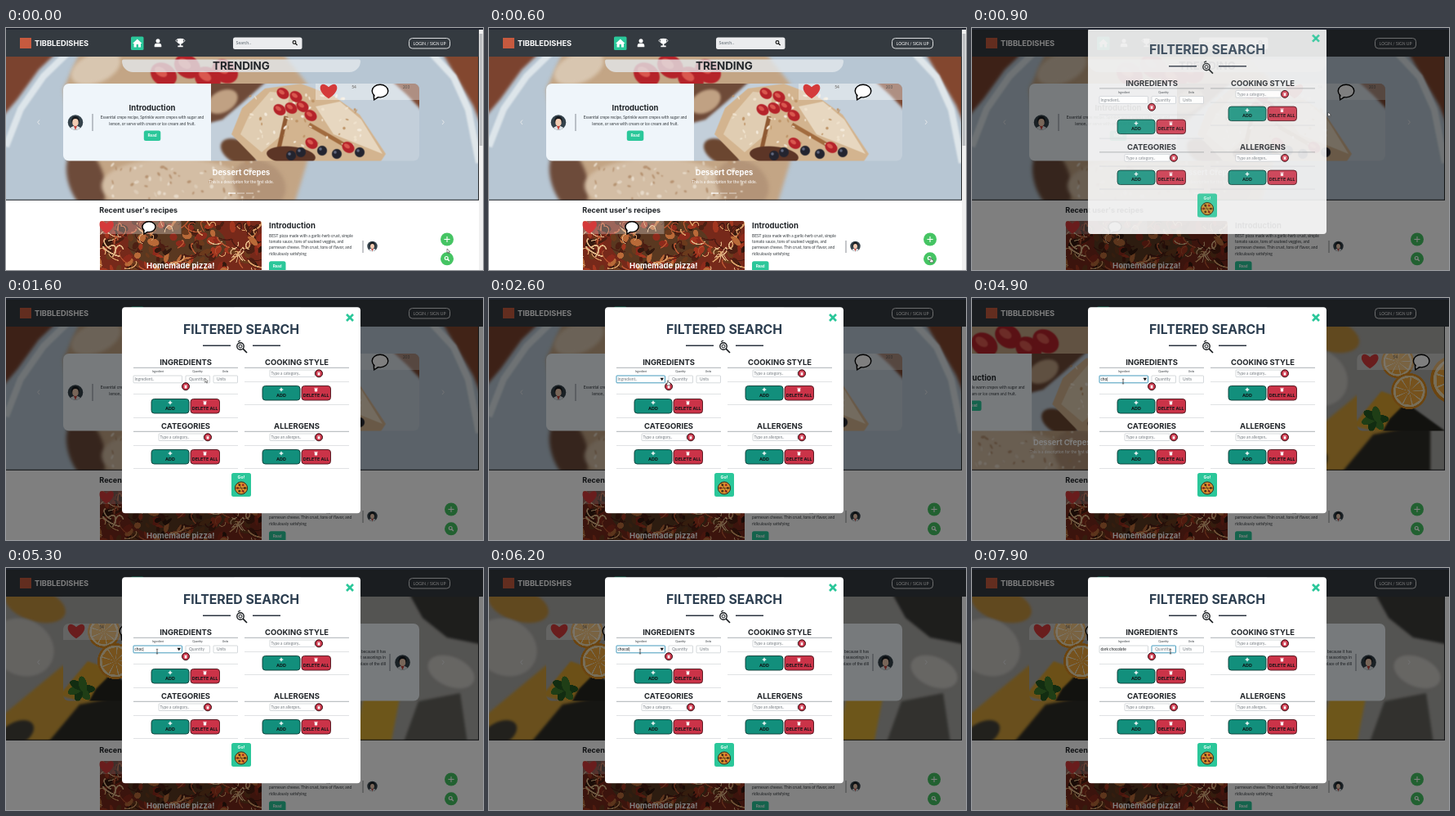
These frames come from a looping animation (584x296 px, 8000 ms). An HTML page with a canvas:

```html
<!DOCTYPE html>
<html lang="en">
<head>
<meta charset="utf-8">
<title>Recipe search</title>
<style>
html, body { margin: 0; width: 584px; height: 296px; overflow: hidden; background: #fff; }
canvas { display: block; width: 584px; height: 296px; }
</style>
</head>
<body>
<canvas id="stage"></canvas>
<script>
const W = 584, H = 296, LOOP = 8000, PAGE = 579;
const HEAD = 'Inter, "Open Sans", sans-serif', BODY = 'Lato, "Open Sans", sans-serif';
const INK = '#212529', GREEN = '#2bc79a', ROUND = '#45c463', RED = '#cb3348', TEAL = '#128f7c';
const dpr = window.devicePixelRatio || 1;
const stage = document.getElementById('stage');
stage.width = W * dpr;
stage.height = H * dpr;
let c = stage.getContext('2d');

const clamp = v => Math.max(0, Math.min(1, v));
const mix = (a, b, p) => a + (b - a) * p;
const smooth = p => p * p * (3 - 2 * p);

function rng(seed) {
  return () => (seed = (seed * 16807) % 2147483647) / 2147483647;
}
function box(x, y, w, h, r, fill, line, lw = 1) {
  c.beginPath();
  c.roundRect(x, y, w, h, r);
  if (fill) { c.fillStyle = fill; c.fill(); }
  if (line) { c.strokeStyle = line; c.lineWidth = lw; c.stroke(); }
}
function oval(x, y, rx, ry, rot, fill, line, lw = 1) {
  c.beginPath();
  c.ellipse(x, y, rx, ry, rot, 0, 7);
  if (fill) { c.fillStyle = fill; c.fill(); }
  if (line) { c.strokeStyle = line; c.lineWidth = lw; c.stroke(); }
}
function disc(x, y, r, fill, line, lw) { oval(x, y, r, r, 0, fill, line, lw); }
function poly(pts, fill, line, lw = 1, close = true) {
  c.beginPath();
  pts.forEach(p => c.lineTo(p[0], p[1]));
  if (close) c.closePath();
  if (fill) { c.fillStyle = fill; c.fill(); }
  if (line) { c.strokeStyle = line; c.lineWidth = lw; c.stroke(); }
}
function seg(x1, y1, x2, y2, color, lw = 1) {
  poly([[x1, y1], [x2, y2]], null, color, lw, false);
}
function text(s, x, y, size, color, align = 'left', font = BODY, weight = 400) {
  c.font = `${weight} ${size}px ${font}`;
  c.textAlign = align;
  c.textBaseline = 'alphabetic';
  c.fillStyle = color;
  c.fillText(s, x, y + size * 0.35);
}
function title(s, x, y, size, color = INK, align = 'center') {
  text(s, x, y, size, color, align, HEAD, 700);
}
function clipped(x, y, w, h, r, draw) {
  c.save();
  c.beginPath();
  c.roundRect(x, y, w, h, r);
  c.clip();
  draw();
  c.restore();
}

// Soft stand-ins for the food photographs, painted once
function photo(w, h, paint) {
  const k = 3, cv = document.createElement('canvas'), main = c;
  cv.width = w * k;
  cv.height = h * k;
  c = cv.getContext('2d');
  c.scale(k, k);
  paint(w, h);
  c = main;
  return cv;
}
function specks(rnd, n, x, y, w, h, r, colors) {
  for (let i = 0; i < n; i++) {
    oval(x + rnd() * w, y + rnd() * h, r * (0.5 + rnd()), r * (0.3 + rnd() * 0.7), rnd() * 3,
      colors[Math.floor(rnd() * colors.length)]);
  }
}
function berry(x, y, r) {
  oval(x, y, r, r * 0.8, 0.6, '#b5232a');
  oval(x - r * 0.2, y - r * 0.2, r * 0.5, r * 0.3, 0.6, '#d9584f');
}
const crepes = photo(255, 95, (w, h) => {
  const rnd = rng(11);
  box(0, 0, w, h, 0, '#c3cfda');
  c.filter = 'blur(5px)';
  poly([[-9, -9], [75, -9], [40, 22], [14, 44], [-9, 50]], '#6e4a38');
  oval(14, 22, 20, 13, -0.5, '#c0a183');
  poly([[215, -9], [265, -9], [265, 40], [240, 14]], '#7c4a35');
  oval(34, 84, 24, 14, 0.5, '#6b4630');
  c.filter = 'blur(1.5px)';
  poly([[25, 62], [38, 30], [66, 6], [110, 0], [150, 15], [182, 38], [214, 86], [206, 98], [60, 98]], '#d3b48f');
  poly([[46, 40], [72, 10], [96, 12], [90, 60], [62, 84], [36, 62]], '#e0cdb2');
  poly([[128, 28], [158, 22], [184, 44], [210, 86], [150, 62]], '#e7d7c0');
  seg(92, 40, 82, 84, '#8f5a33', 5);
  seg(120, 50, 165, 76, '#a26c3f', 5);
  oval(98, 88, 30, 11, 0.1, '#5c3526');
  specks(rnd, 60, 48, 14, 135, 62, 2, ['#f3eadb', '#efe2cd', '#be9467']);
  for (const [x, y] of [[88, 12], [104, 16], [112, 28], [84, 32], [122, 39], [98, 30], [123, 73], [168, 78]]) berry(x, y, 8);
  for (const [x, y] of [[98, 88], [110, 84], [136, 82], [154, 86], [182, 84]]) {
    disc(x, y, 6, '#23242f');
    disc(x - 2, y - 2, 1.8, '#626980');
  }
});
const crepesWide = photo(PAGE, 176, (w, h) => {
  const rnd = rng(5);
  box(0, 0, w, h, 0, '#b7c6d3');
  c.filter = 'blur(6px)';
  poly([[-20, -20], [78, -20], [40, 16], [14, 52], [-20, 92]], '#7b432f');
  poly([[525, -20], [600, -20], [600, 130], [572, 60]], '#83472f');
  c.filter = 'blur(3px)';
  poly([[76, -5], [46, 24], [18, 64], [0, 110]], null, '#dde5ea', 8, false);
  poly([[520, -5], [548, 25], [566, 65], [579, 130]], null, '#dfe6ea', 8, false);
  c.filter = 'blur(7px)';
  poly([[70, 40], [95, -15], [330, -15], [390, 60], [350, 190], [90, 190]], '#c3a585');
  oval(110, 14, 32, 18, -0.4, '#d8c6b0');
  oval(98, 150, 22, 40, -0.3, '#6d4b3a');
  oval(205, 158, 88, 34, 0, '#d3bda4');
  oval(310, 156, 34, 28, 0.6, '#b39478');
  c.filter = 'blur(2px)';
  for (const [x, y] of [[193, 22], [222, 12], [247, 27], [268, 18]]) berry(x, y, 17);
  specks(rnd, 60, 130, 128, 180, 48, 2.4, ['#e6d9c8', '#b69372', '#dccbb6']);
});
function slice(x, y, r) {
  disc(x, y, r, '#d98b21');
  disc(x, y, r * 0.88, '#f0ddb4');
  for (let i = 0; i < 9; i++) {
    const a = i * Math.PI * 2 / 9;
    poly([[x, y], [x + r * 0.78 * Math.cos(a), y + r * 0.78 * Math.sin(a)],
      [x + r * 0.78 * Math.cos(a + 0.6), y + r * 0.78 * Math.sin(a + 0.6)]], '#eda53b');
  }
}
const oranges = photo(255, 95, (w, h) => {
  box(0, 0, w, h, 0, '#a9a9a6');
  c.filter = 'blur(3px)';
  poly([[-5, 88], [30, 46], [70, 60], [40, 100]], '#d9a12e');
  poly([[40, 80], [60, 60], [110, 96], [30, 98]], '#25251f');
  c.filter = 'blur(0.7px)';
  slice(50, 10, 20);
  slice(64, 46, 22);
  slice(120, 32, 30);
  slice(158, 66, 24);
  for (let i = 0; i < 6; i++) {
    oval(22 + 7 * Math.cos(i), 80 + 6 * Math.sin(i), 10, 5, i * 0.9, i % 2 ? '#3f7d2c' : '#245a22');
  }
});
const orangesWide = photo(PAGE, 176, (w, h) => {
  box(0, 0, w, h, 0, '#aaa9a5');
  c.filter = 'blur(5px)';
  oval(36, 10, 38, 20, 0.3, '#c4933f');
  oval(20, 62, 40, 34, 0.5, '#c9c7c2');
  poly([[-10, 150], [70, 84], [150, 120], [60, 186], [-10, 186]], '#d3a03a');
  poly([[45, 186], [90, 132], [160, 118], [160, 186]], '#2d2c27');
  oval(12, 168, 24, 14, -0.5, '#45423a');
  poly([[425, 186], [440, 112], [482, 124], [470, 186]], '#dcae35');
  poly([[490, -10], [590, -10], [590, 60], [540, 50], [510, 26]], '#3c3c39');
  poly([[484, 186], [505, 128], [556, 118], [566, 186]], '#64635d');
  oval(545, 92, 30, 18, 0.4, '#cfcdc8');
});
const pizza = photo(199, 62, (w, h) => {
  const rnd = rng(29);
  box(0, 0, w, h, 0, '#76291a');
  c.filter = 'blur(0.5px)';
  oval(95, 28, 60, 30, 0, '#5a3820');
  specks(rnd, 150, 0, 0, w, h, 5, ['#a2361f', '#4d2013', '#b96a38', '#33190f', '#8d2a1b', '#6b3a1c']);
  for (let i = 0; i < 80; i++) {
    const a = rnd() * 6;
    c.beginPath();
    c.ellipse(rnd() * w, rnd() * h, 4 + rnd() * 9, 2 + rnd() * 4, a, a, a + 2.6);
    c.strokeStyle = ['#dba069', '#b85632', '#e2b787', '#4b1a12'][i % 4];
    c.lineWidth = 0.8 + rnd();
    c.stroke();
  }
});

function heart(x, y, s) {
  c.beginPath();
  c.moveTo(x, y + s);
  c.bezierCurveTo(x - s * 1.9, y - s * 0.2, x - s, y - s * 1.6, x, y - s * 0.5);
  c.bezierCurveTo(x + s, y - s * 1.6, x + s * 1.9, y - s * 0.2, x, y + s);
  c.fillStyle = '#d43a3a';
  c.fill();
}
function bubble(x, y, s) {
  poly([[x - s * 0.8, y + s * 0.3], [x - s * 0.75, y + s], [x - s * 0.1, y + s * 0.6]], '#fff', '#000', 1.5);
  oval(x, y - s * 0.1, s, s * 0.8, 0, '#fff', '#000', 1.4);
  poly([[x - s * 0.65, y + s * 0.3], [x - s * 0.65, y + s * 0.8], [x - s * 0.1, y + s * 0.5]], '#fff');
}
function avatar(x, y, r) {
  disc(x, y, r, '#34424b');
  clipped(x - r, y - r, r * 2, r * 2, r, () => {
    oval(x, y + r, r * 0.75, r * 0.55, 0, '#dfe5e8');
    poly([[x - r * 0.25, y + r * 0.4], [x + r * 0.25, y + r * 0.4], [x, y + r]], '#c4443c');
    oval(x, y - r * 0.25, r * 0.52, r * 0.55, 0, '#171a1e');
    oval(x, y, r * 0.4, r * 0.48, 0, '#f2cdb4');
  });
}
function lens(x, y, r, color, lw) {
  disc(x, y, r, null, color, lw);
  seg(x + r * 0.7, y + r * 0.7, x + r * 1.9, y + r * 1.9, color, lw * 1.2);
}
function cross(x, y, r, color, lw) {
  seg(x - r, y, x + r, y, color, lw);
  seg(x, y - r, x, y + r, color, lw);
}
function bin(x, y, s) {
  box(x - s * 0.75, y - s * 0.55, s * 1.5, s * 1.6, 0.4, '#fff');
  seg(x - s, y - s * 0.85, x + s, y - s * 0.85, '#fff', s * 0.35);
}
function pie(x, y, r) {
  disc(x, y, r, '#d9912f', '#3a2518', 1);
  for (let i = 0; i < 6; i++) {
    disc(x + r * 0.58 * Math.cos(i * 1.05), y + r * 0.58 * Math.sin(i * 1.05), r * 0.19, i % 2 ? '#a52a20' : '#4a3217');
  }
  seg(x - r, y, x + r, y, '#3a2518', 0.6);
  seg(x - r * 0.5, y - r * 0.85, x + r * 0.5, y + r * 0.85, '#3a2518', 0.6);
}
function readButton(x, y) {
  box(x, y, 20.5, 12.5, 2.5, GREEN);
  text('Read', x + 10.2, y + 6.2, 4.9, '#fff', 'center', BODY, 700);
}

function nav() {
  box(0, 0, W, 35, 0, '#343a40');
  box(17, 12, 14, 13, 0, '#c65a3f');
  title('TIBBLEDISHES', 35, 19, 9.3, '#fff', 'left');
  box(153, 10.5, 15.5, 16.5, 1.5, GREEN);
  poly([[155, 19], [160.8, 13.5], [166.6, 19], [165, 19], [165, 23.5], [162, 23.5], [162, 20],
    [159.6, 20], [159.6, 23.5], [156.6, 23.5], [156.6, 19]], '#fff');
  disc(186, 15.8, 2.5, '#fff');
  box(181.7, 18.8, 8.6, 4.5, [3, 3, 0.5, 0.5], '#fff');
  oval(213.5, 15.5, 5.4, 2.2, 0, null, '#fff', 1);
  box(210, 13, 7, 6.5, [0, 0, 3, 3], '#fff');
  box(212.7, 19, 1.6, 3, 0, '#fff');
  box(210.3, 21.6, 6.4, 1.6, 0.5, '#fff');
  box(278, 11.5, 84.5, 14.5, 2.5, '#ebecee');
  text('Search..', 281.5, 18.5, 5.4, '#5e6870');
  lens(353, 17.5, 1.9, '#111', 1.1);
  box(493.5, 12.5, 50, 12.5, 4, null, '#eef0f1', 0.9);
  text('LOGIN / SIGN UP', 518.6, 18.8, 5, '#fff', 'center');
}
function reactions(x) {
  box(x, 68, 127, 20, 0, 'rgba(255,255,255,.38)');
  heart(x + 16, 77, 9.3);
  text('54', x + 47, 72, 4.9, '#5d5853', 'center');
  bubble(x + 79, 78, 9.8);
  text('203', x + 111, 72, 4.9, '#5d5853', 'center');
}
function slide(n) {
  const left = n ? 325 : 70, mid = n ? 397 : 179;
  c.drawImage(n ? orangesWide : crepesWide, 0, 35, PAGE, 176);
  clipped(70, 68, 436, 94.5, 7, () => {
    c.drawImage(n ? oranges : crepes, n ? 70 : 251, 68, 255, 95);
    box(left, 68, 181, 95, 0, '#eff5fa');
    reactions(n ? 70 : 379);
  });
  title('Introduction', mid, 98 - n * 8, 9.5);
  const lines = n
    ? ['A light salad that everyone loves because it has', 'a sweet dressing, with bright seasonings in', 'each bite; mint may take the place of the dill']
    : ['Essential crepe recipe, Sprinkle warm crepes with sugar and', 'lemon, or serve with cream or ice cream and fruit.'];
  lines.forEach((s, i) => n
    ? text(s, 465, 102 + i * 7.5, 4.87, '#33393e', 'right')
    : text(s, mid, 109.7 + i * 7.5, 4.87, '#33393e', 'center'));
  readButton(mid - 10.2, n ? 130 : 125.5);
  avatar(n ? 485.5 : 85, 115.5, 9.3);
  seg(n ? 470 : 106, 105, n ? 470 : 106, 126, '#596168', 0.7);
  title(n ? 'Orange Salad' : 'Dessert Crepes', 288, 177, 9.3, '#fff');
  text(`This is a description for the ${n ? 'second' : 'first'} slide.`, 288, 188, 4.87, '#fff', 'center');
}
function hero(t) {
  // ease-in-out slide, 600 ms
  const p = clamp((t - 4680) / 600), shift = PAGE * smooth(p);
  clipped(0, 35, PAGE, 176, 0, () => {
    for (let n = 0; n < 2; n++) {
      const x = n * PAGE - shift;
      if (Math.abs(x) >= PAGE) continue;
      c.save();
      c.translate(x, 0);
      slide(n);
      c.restore();
    }
    box(142, 38.5, 292, 15.5, [2, 2, 14, 14], 'rgba(228,234,238,.78)');
    title('TRENDING', 288, 46.7, 13.4);
    for (let i = 0; i < 3; i++) {
      box(272 + i * 11, 201.5, 9, 1.2, 0, i === (p > 0 ? 1 : 0) ? '#fff' : 'rgba(255,255,255,.5)');
    }
    poly([[41, 112.5], [38.7, 115.2], [41, 118]], null, '#e6e8ea', 1, false);
    poly([[534, 112.5], [536.3, 115.2], [534, 118]], null, '#e6e8ea', 1, false);
  });
  seg(0, 210.3, PAGE, 210.3, '#25282b', 1);
  seg(578.5, 35, 578.5, 210.5, '#25282b', 1);
}
function recent() {
  title("Recent user's recipes", 114.3, 223, 9.05, INK, 'left');
  clipped(114.5, 236, 198.5, 62, 3, () => {
    c.drawImage(pizza, 114.5, 236, 199, 62);
    box(114.5, 236, 100, 16, 0, 'rgba(255,255,255,.28)');
    heart(123, 243.5, 8);
    bubble(175, 244, 8);
    title('Homemade pizza!', 213.8, 291, 9.5, '#fff');
  });
  title('Introduction', 322, 242, 9.5, INK, 'left');
  ['BEST pizza made with a garlic-herb crust, simple', 'tomato sauce, tons of sauteed veggies, and',
    'parmesan cheese. Thin crust, tons of flavor, and', 'ridiculously satisfying']
    .forEach((s, i) => text(s, 322, 253.8 + i * 7.4, 4.87, '#33393e'));
  seg(437, 260, 437, 275, '#596168', 0.7);
  avatar(448.5, 267, 6.2);
  readButton(322, 285.3);
}
function page(t, open) {
  box(0, 0, W, H, 0, '#fff');
  nav();
  hero(t);
  recent();
  const x = open ? 545 : 540;
  disc(x, 258.5, 8, ROUND);
  cross(x, 258.5, 3.6, '#fff', 1.1);
  disc(x, 282.3, 8, ROUND);
  lens(x - 0.8, 281.4, 1.9, '#fff', 1.2);
  if (!open) {
    box(PAGE, 2, 5, H, 0, '#f0f0f0');
    box(PAGE + 0.7, 7, 3.6, 137, 0, '#bcbec1');
  }
}

function field(x, y, w, h, label, focus, value) {
  box(x, y, w, h, 0.8, '#fff', focus ? '#2f8fb5' : '#b9bfc4', focus ? 0.9 : 0.6);
  clipped(x - 0.5, y, w, h, 0, () =>
    text(value || label, x + 1.5, y + h / 2, 4.87, value ? '#15191c' : '#767d83'));
}
function trash(x, y) {
  disc(x, y, 4.5, RED, '#331014', 1);
  bin(x, y + 0.2, 1.9);
}
function buttons(x, y) {
  box(x + 0.5, y + 0.5, 46, 17.5, 3.5, TEAL, '#0c3b35', 0.9);
  cross(x + 23.5, y + 5, 2.3, '#fff', 1.3);
  title('ADD', x + 23.5, y + 12, 5.4, '#101416');
  box(x + 48.5, y + 0.5, 35.5, 17.5, 3.5, RED, '#4a1119', 0.9);
  bin(x + 66, y + 5.2, 2.2);
  title('DELETE ALL', x + 66.2, y + 12, 5.4, '#101416');
}
function rule(x, y, color = '#d3d6d9') { seg(x, y, x + 128, y, color, 0.7); }
function group(x, y, name, hint) {
  title(name, x + 64, y, 9.45);
  rule(x, y + 6.3, '#8a9095');
  field(x + 31, y + 9, 55, 8.5, hint);
  trash(x + 91, y + 13.3);
  rule(x, y + 23.5);
  buttons(x + 21.5, y + 28);
  rule(x, y + 51.5);
}
const TYPED = [[3900, 'c'], [4300, 'ch'], [4750, 'cho'], [5300, 'choc'], [5600, 'choco'], [5900, 'chocol'], [6900, 'dark chocolate']];
function modal(t) {
  box(142, 11.3, 292, 252, 4, '#fff');
  title('FILTERED SEARCH', 288, 38, 15.8, '#2c3e50');
  seg(241, 58.2, 275, 58.2, '#2c3440', 1.5);
  seg(302, 58.2, 336, 58.2, '#2c3440', 1.5);
  lens(287, 59, 4.2, '#15191c', 1.4);
  disc(287, 59, 2, null, '#15191c', 1);
  seg(284, 53.5, 287, 52, '#15191c', 1.2);
  seg(417, 20, 425, 28, GREEN, 2.7);
  seg(425, 20, 417, 28, GREEN, 2.7);

  const value = TYPED.reduce((v, [at, s]) => t >= at ? s : v, '');
  const onName = t >= 2250 && t < 7400, onQty = t >= 7400;
  title('INGREDIENTS', 220, 79, 9.45);
  rule(156, 85.3, '#8a9095');
  text('Ingredient', 186, 90, 3.2, '#33393e', 'center');
  text('Quantity', 234.5, 90, 3.2, '#33393e', 'center');
  text('Units', 268.5, 90, 3.2, '#33393e', 'center');
  field(156, 95, 59.5, 8.8, 'Ingredient..', onName, value);
  if (onName) {
    poly([[209.5, 97.7], [214, 97.7], [211.75, 101.2]], '#111');
    if (t % 1000 < 500 || value) {
      c.font = `4.87px ${BODY}`;
      const x = 157.8 + c.measureText(value).width;
      seg(x, 97, x, 102, '#333', 0.5);
    }
  }
  field(220, 95, 29.5, 8.8, '  Quantity', onQty);
  field(254, 95, 29.5, 8.8, '  Units');
  trash(220, 108.2);
  rule(156, 117.5);
  buttons(177.5, 123);
  rule(156, 146.5);
  group(292, 79, 'COOKING STYLE', 'Type a category..');
  group(156, 157, 'CATEGORIES', 'Type a category..');
  group(292, 157, 'ALLERGENS', 'Type an allergen..');
  box(276, 214, 24, 29, 2.5, GREEN);
  title('Go!', 288, 219.3, 5.2, '#fff');
  pie(288, 232.5, 7.6);
}

const PATH = [[0, 540, 271, 'arrow'], [300, 540, 271, 'arrow'], [500, 541, 282, 'hand'], [780, 541, 282, 'hand'],
  [900, 436, 104, 'arrow'], [1500, 250, 99, 'arrow'], [2000, 190, 100, 'beam'], [2350, 190, 100, 'beam'],
  [2600, 219, 102, 'hand'], [3000, 185, 102, 'beam'], [6400, 185, 102, 'beam'], [6700, 180, 108, 'arrow'],
  [6950, 180, 108, 'arrow'], [7350, 243, 102, 'beam'], [8000, 243, 102, 'beam']];
function cursor(t) {
  const i = PATH.findIndex((k, n) => n && t < k[0]);
  const a = PATH[i - 1], b = PATH[i], p = smooth((t - a[0]) / (b[0] - a[0]));
  const kind = (p < 0.75 ? a : b)[3];
  c.save();
  c.translate(mix(a[1], b[1], p), mix(a[2], b[2], p));
  if (kind === 'beam') {
    seg(0, -2.5, 0, 2.8, '#222', 0.7);
    seg(-1.2, -2.7, 1.2, -2.7, '#222', 0.6);
    seg(-1.2, 2.9, 1.2, 2.9, '#222', 0.6);
  } else if (kind === 'hand') {
    poly([[-0.6, -1], [0.6, -1], [0.7, 1.2], [3, 1.8], [2.8, 4.8], [-0.8, 4.8], [-2.3, 2.2], [-0.6, 2.4]], '#fff', '#222', 0.5);
  } else {
    poly([[0, -1], [0, 4.2], [1.2, 3.1], [2.1, 5], [2.9, 4.6], [2, 2.8], [3.6, 2.7]], '#fff', '#222', 0.5);
  }
  c.restore();
}

function draw(t) {
  c.setTransform(dpr, 0, 0, dpr, 0, 0);
  const dim = 0.5 * clamp((t - 750) / 130), alpha = clamp((t - 770) / 150);
  page(t, dim > 0);
  if (dim > 0) box(0, 0, W, H, 0, `rgba(0,0,0,${dim})`);
  if (alpha > 0) {
    c.save();
    c.globalAlpha = alpha;
    c.translate(0, -15 * Math.pow(1 - clamp((t - 850) / 250), 1.2));
    modal(t);
    c.restore();
  }
  box(0, 0, W, 2, 0, '#20242f');
  cursor(t);
}
const start = performance.now();
function tick() {
  draw((performance.now() - start) % LOOP);
  requestAnimationFrame(tick);
}
tick();
</script>
</body>
</html>
```
